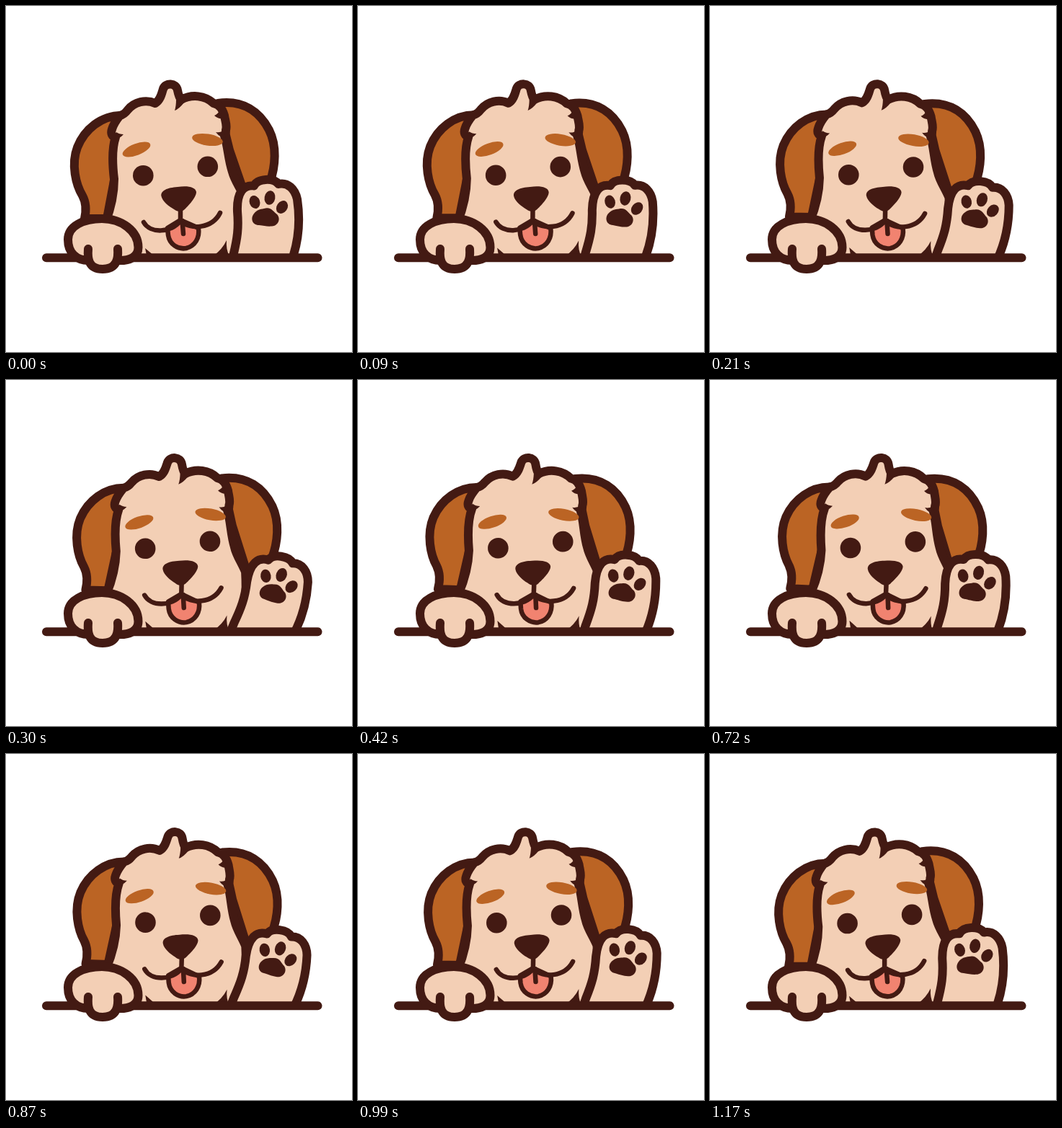
Animation, 480 px wide and 480 px high, one loop 1.2 s. Source, as an HTML page:

```html
<!DOCTYPE html>
<html lang="en">
<head>
<meta charset="utf-8">
<title>Waving puppy</title>
<style>
html, body { margin: 0; width: 100%; height: 100%; overflow: hidden; background: #fff; }
svg { display: block; width: 100vw; height: 100vh; }
.line { stroke: #431a13; stroke-width: 12; stroke-linejoin: round; stroke-linecap: round; fill: none; }
.thin { stroke-width: 6.5; }
.fur { fill: #f3cfb5; }
.ear { fill: #bb6424; }
.tongue { fill: #f18370; }
.dark { fill: #431a13; }
</style>
</head>
<body>
<svg viewBox="0 0 480 480">
  <defs>
    <clipPath id="above"><rect width="480" height="349"/></clipPath>
  </defs>
  <g clip-path="url(#above)">
    <g id="head">
      <path class="line ear" d="M160 152C132 152 109 171 99 196C90 220 97 248 106 263C112 274 111 286 109 295L140 295L158 200Z"/>
      <path class="line ear" d="M294 135C329 130 352 147 365 172C376 194 374 222 366 245C360 260 345 265 330 258L310 200Z"/>
      <path class="line fur" d="M130 365L138 300C145 282 150 262 150 240C147 215 147 197 152 182C147 181 145 177 147 171C149 164 154 157 158 152C163 151 166 148 169 144C178 133 194 129 207 135C214 131 216 122 218 115C221 106 236 106 238 117C239 122 240 127 243 130C258 122 276 124 288 135C295 136 300 142 303 152C304 159 307 166 305 172C305 176 304 179 303 180C308 195 308 212 314 230C317 242 325 252 330 264C333 300 330 330 328 365Z"/>
      <path class="dark" d="M150 185Q157 185 163 178Q157 178 153 175ZM305 183Q297 183 291 175Q298 176 302 172ZM301 156Q294 157 289 152Q294 150 297 144ZM236 130Q236 139 234 145Q240 143 247 134Z"/>
      <ellipse class="ear" cx="181" cy="199" rx="20.5" ry="8" transform="rotate(-21 181 199)"/>
      <ellipse class="ear" cx="279.5" cy="185.5" rx="21.5" ry="8" transform="rotate(9 279.5 185.5)"/>
      <circle class="dark" cx="190.3" cy="235.2" r="14.3"/>
      <circle class="dark" cx="279.8" cy="222.8" r="14.3"/>
      <path class="line thin tongue" d="M224 308L225 318C227 331 239 338 250 336C262 333 269 322 267 308L242 297Z"/>
      <path class="line thin" d="M244.5 298L246 316M242 282L242 297M191 300C200 316 229 315 242 298C256 311 286 309 297 287"/>
      <path class="dark" d="M215.5 264C214 256 224 252 238 251C252 249 263 251 264 258C264 266 252 278 248 282C244 286 238 286 233 282C226 278 217 271 215.5 264Z"/>
      <path class="dark" d="M193 336L205 346L195 346ZM306 325Q300 338 287 347L310 347Q305 338 306 325Z"/>
    </g>
    <g id="paw">
      <path class="line fur" d="M312 365L315.5 345C321 322 323 308 321 285C320 259 329 248 344 249.5C349 239 371 238 378 247C391 244 401 254 404 268C408 295 406 322 399 345L394 365Z"/>
      <ellipse class="dark" cx="345" cy="272" rx="7.2" ry="9.2" transform="rotate(-20 345 272)"/>
      <ellipse class="dark" cx="366" cy="266" rx="7.4" ry="9.8" transform="rotate(10 366 266)"/>
      <ellipse class="dark" cx="383" cy="279" rx="7.4" ry="9.5" transform="rotate(35 383 279)"/>
      <path class="dark" d="M358 281C368 278 371 286 376 289C382 296 377 305 369 305.5C362 306 358 305 351 304C341 304 339 294 344 288C348 283 352 282 358 281Z"/>
    </g>
  </g>
  <path class="line" d="M56 349.2H432.5"/>
  <path class="line fur" d="M115 353C97 353 86 342 86 324C86 305 108 295 133 295C160 295 183.5 312 183.5 335C183.5 348 172 354 154 353Z"/>
  <path class="line fur" d="M114 337C113 350 114 365 134 365C154 365 156 350 155 337"/>
</svg>
<script>
const LOOP = 1200, STEP = 30;
const head = document.getElementById('head');
const paw = document.getElementById('paw');

// Linear swing 0 -> 1 -> 0 over one period
const swing = (t, period) => 1 - Math.abs(1 - 2 * (t % period) / period);
const turn = (el, angle, x, y) => el.setAttribute('transform', `rotate(${angle} ${x} ${y})`);

function draw(ms) {
  const t = Math.floor((ms % LOOP) / STEP) * STEP;
  turn(head, 3 * swing(t, LOOP), 245, 345);
  turn(paw, 12 * swing(t, LOOP / 2), 353, 345);
}

let start;
function tick(now) {
  start ??= now;
  draw(now - start);
  requestAnimationFrame(tick);
}
draw(0);
requestAnimationFrame(tick);
</script>
</body>
</html>
```
